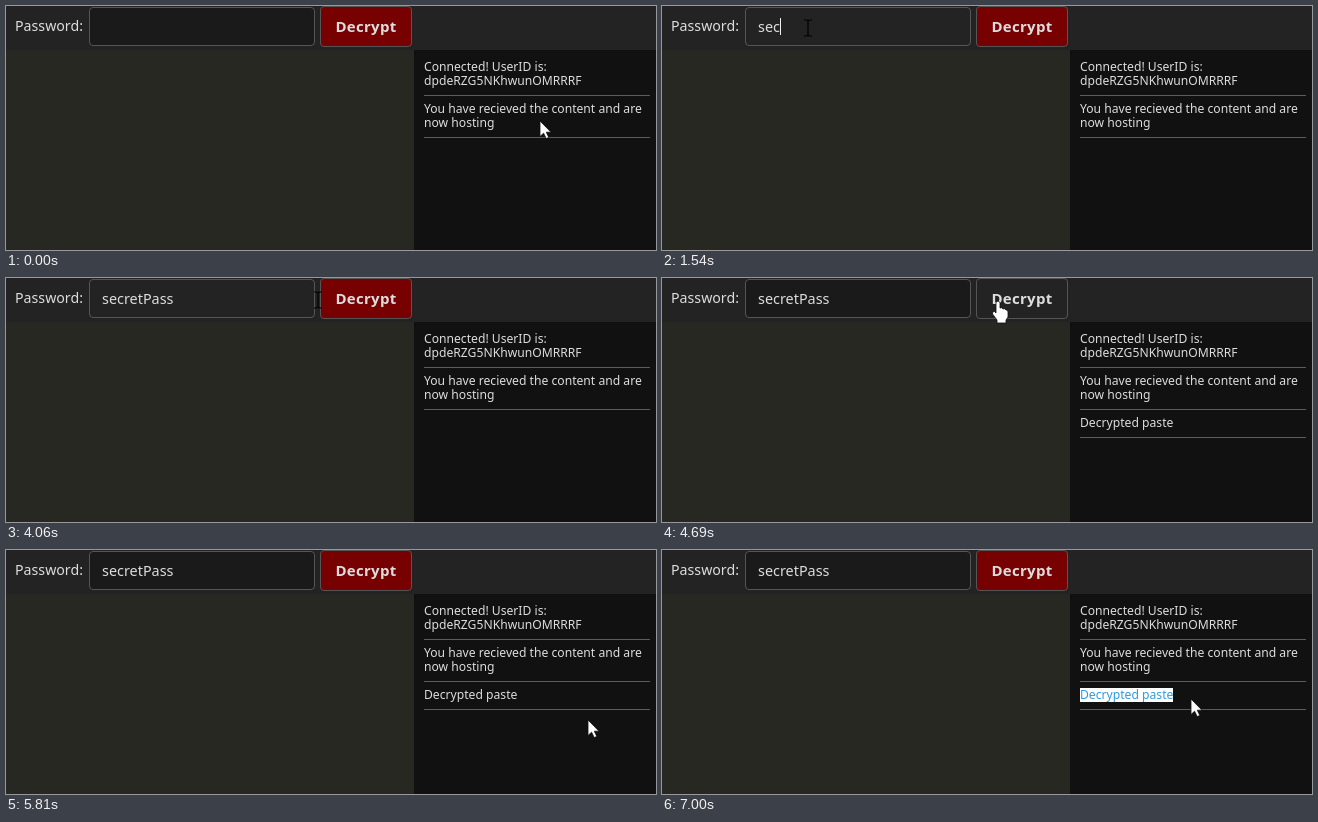
An HTML page for the animation above (7210 ms loop, 650 by 244 pixels).

```html
<!DOCTYPE html>
<html lang="en">
<head>
<meta charset="utf-8">
<title>Decrypt</title>
<style>
  html, body { margin: 0; width: 100%; height: 100%; overflow: hidden; background: #272822; }
  #stage {
    position: relative; width: 650px; height: 244px; overflow: hidden;
    background: #272822; color: #ddd; font-family: "Noto Sans", "Open Sans", sans-serif;
  }
  #stage > * { position: absolute; box-sizing: border-box; }
  #bar { left: 0; top: 0; width: 650px; height: 44px; background: #232323; }
  #label { left: 9px; top: 0; font-size: 14.2px; line-height: 40px; }
  #field, #button { border: 1px solid #555; border-radius: 4px; white-space: pre; }
  #field {
    left: 83px; top: 1px; width: 226px; height: 39px; padding-left: 12px;
    display: flex; align-items: center; font-size: 14.4px; line-height: 37px;
  }
  #caret { width: 1px; height: 17px; background: #eee; }
  #button {
    left: 314px; top: 0; width: 92px; height: 41px; text-align: center;
    font-size: 15px; font-weight: 700; line-height: 39px; letter-spacing: .3px;
  }
  #log {
    left: 408px; top: 44px; width: 242px; height: 200px; padding: 4px 6px 0 10px;
    background: #111; font-size: 12.15px; line-height: 14px; white-space: nowrap;
  }
  .entry { padding: 6px 0 7px; border-bottom: 1px solid #5c5c5c; }
  .word { display: inline-block; height: 14px; vertical-align: top; white-space: pre; }
  .selected { background: #fff; color: #2f9bdc; }
  #cursors { left: 0; top: 0; }
</style>
</head>
<body>
<div id="stage">
  <div id="bar"></div>
  <div id="label">Password:</div>
  <div id="field"><span id="typed"></span><i id="caret"></i></div>
  <div id="button">Decrypt</div>
  <div id="log">
    <div class="entry">Connected! UserID is:<br>dpdeRZG5NKhwunOMRRRF</div>
    <div class="entry">You have recieved the content and are<br>now hosting</div>
    <div class="entry" id="result"><span class="word">Decrypted</span><span class="word"> paste</span></div>
  </div>
  <svg id="cursors" width="650" height="244">
    <g id="pointer">
      <path id="arrow" d="M0 0V15.5L3.6 12.2L6.2 17.6L8.8 16.4L6.3 11.2H11Z" fill="#fff" stroke="#111" stroke-width=".8"/>
      <path id="beam" d="M-4 -8H-1.5L0 -7L1.5 -8H4M0 -7V7M-4 8H-1.5L0 7L1.5 8H4" fill="none" stroke="#000" stroke-width="1.2"/>
      <path id="hand" d="M-2 1.5Q0 -1.5 2 1.5V7Q4 6 5 8Q7 7 8 9Q10 8.5 10 11V16L8 19V22H-1V19L-5.5 13Q-6 10 -3.5 10.5L-2 12Z" fill="#fff" stroke="#111" stroke-width=".8"/>
    </g>
  </svg>
</div>
<script>
  const LOOP = 7210, STEP = 70;
  const PASSWORD = "secretPass";
  const KEY_TIMES = [1120, 1260, 1540, 1750, 1820, 2170, 2590, 2800, 3010, 3220];

  // Pointer hotspot: time, x, y
  const PATH = [
    [0, 534, 115], [630, 146, 22],
    [3500, 146, 22], [3780, 214, 16], [4060, 312, 22], [4270, 336, 23],
    [5040, 336, 23], [5180, 336, 25], [5320, 336, 25],
    [5460, 370, 49], [5810, 582, 170], [5880, 560, 190], [6090, 440, 150],
    [6370, 428, 150], [6580, 428, 150], [7000, 529, 149]
  ];
  const SHAPES = [
    [0, "arrow"], [490, "beam"], [4130, "hand"], [5460, "beam"],
    [5530, "arrow"], [6090, "beam"], [6930, "arrow"]
  ];

  const $ = id => document.getElementById(id);
  const words = document.querySelectorAll(".word");
  const ramp = (t, from, to) => Math.min(1, Math.max(0, (t - from) / (to - from)));
  const smooth = p => p * p * (3 - 2 * p);
  const within = (t, from, to) => t >= from && t < to;
  const show = (el, on) => { el.style.visibility = on ? "visible" : "hidden"; };
  const mix = (a, b, p) => `rgb(${a.map((v, i) => Math.round(v + (b[i] - v) * p))})`;

  function pointerAt(t) {
    const next = PATH.findIndex(point => point[0] > t);
    if (next < 0) return PATH[PATH.length - 1].slice(1);
    const [t0, x0, y0] = PATH[next - 1], [t1, x1, y1] = PATH[next];
    const linear = ramp(t, t0, t1);
    const p = next === 1 ? smooth(linear) : linear;
    return [x0 + (x1 - x0) * p, y0 + (y1 - y0) * p];
  }

  function render(t) {
    const fieldHover = ramp(t, 420, 630) - ramp(t, 4060, 4270);
    const buttonHover = ramp(t, 4060, 4270) - ramp(t, 5320, 5600);
    $("field").style.background = mix([26, 26, 26], [35, 35, 35], fieldHover);
    $("button").style.background = mix([119, 0, 0], [35, 35, 35], buttonHover);

    $("typed").textContent = PASSWORD.slice(0, KEY_TIMES.filter(time => time <= t).length);
    show($("caret"), within(t, 630, 3710) || within(t, 4200, 4620));

    show($("result"), t >= 4690);
    words[0].classList.toggle("selected", t >= 6650);
    words[1].classList.toggle("selected", t >= 6860);

    const [x, y] = pointerAt(t).map(Math.round);
    $("pointer").setAttribute("transform", `translate(${x} ${y})`);
    const shape = SHAPES.filter(([time]) => time <= t).pop()[1];
    for (const id of ["arrow", "beam", "hand"]) {
      $(id).style.display = id === shape ? "" : "none";
    }
  }

  function tick() {
    const t = performance.now() % LOOP;
    render(Math.floor(t / STEP) * STEP);
    requestAnimationFrame(tick);
  }
  tick();
</script>
</body>
</html>
```
